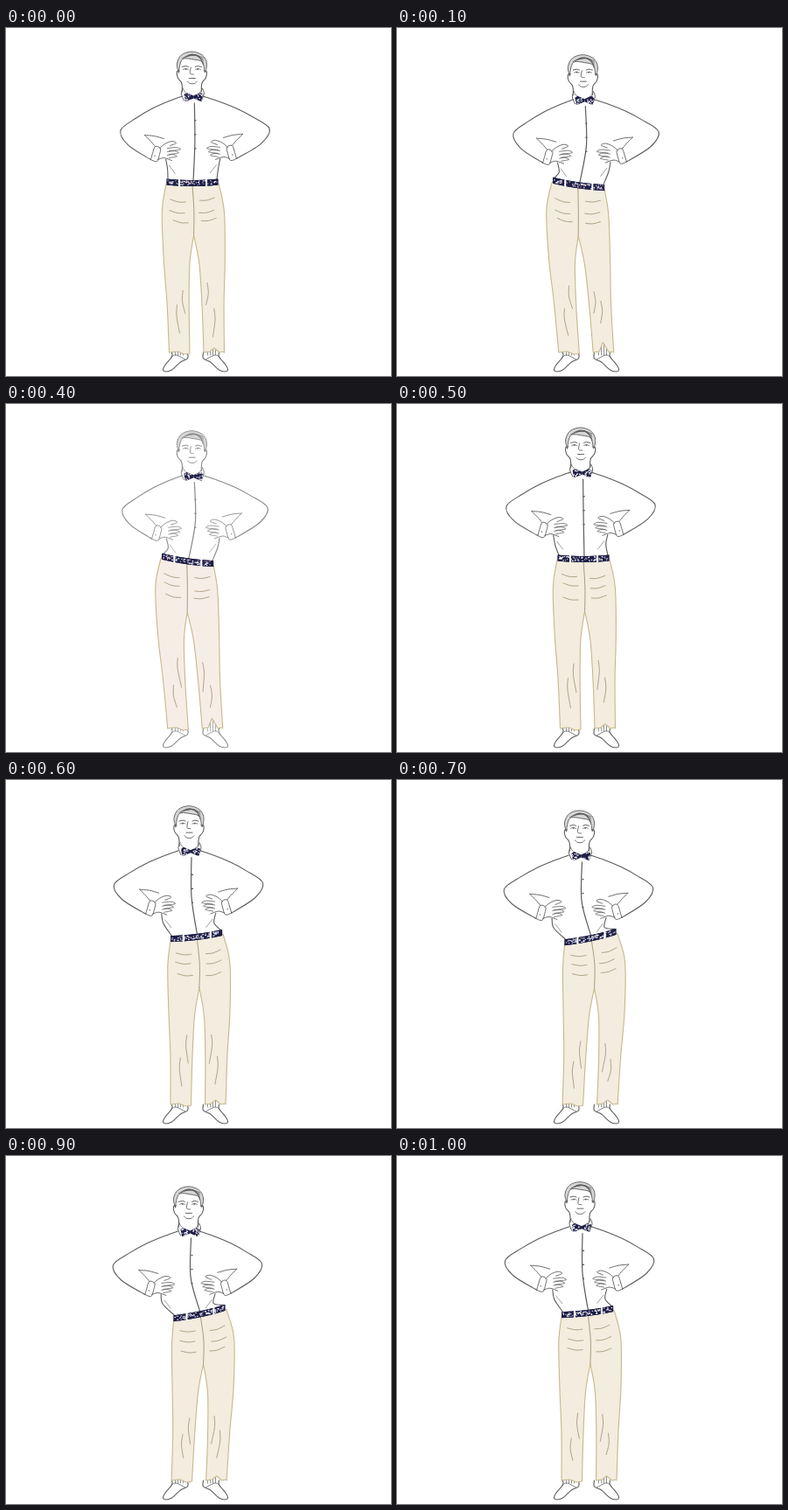
Write an HTML page with a canvas that moves like this. It is 440 px wide and 398 px high and loops after 1.1 s.

```html
<!DOCTYPE html>
<html lang="en">
<head>
<meta charset="utf-8">
<title>Hip sway</title>
<style>
html, body { margin: 0; width: 100%; height: 100%; overflow: hidden; background: #fff; }
canvas { display: block; width: 440px; height: 398px; }
</style>
</head>
<body>
<canvas id="stage" width="440" height="398"></canvas>
<script>
const ctx = document.getElementById('stage').getContext('2d');
const STEP = 100, STEPS = 11, TURN = 5;
const NAVY = '#1f1f48', TAN = '#c9b78c', FOLD = '#a89a7c';
const SIDES = [-1, 1];

function random(seed) {
  return () => (seed = (seed * 16807) % 2147483647) / 2147483647;
}

// The hips swing left for five steps, then right for six.
function poseAt(i) {
  const first = i < TURN;
  const s = first ? -Math.sin(Math.PI * i / TURN)
                  : Math.sin(Math.PI * (i - TURN) / (STEPS - TURN));
  const faded = i === TURN - 1;
  const bob = 10.5 * s * s;
  const drift = (first ? 3 : -3) - 3 * Math.max(s, 0);
  return {
    s,
    ink: faded ? '#8a8a8a' : '#5c5c5c',
    cloth: faded ? '#f7ede7' : '#f3ecdf',
    specks: first ? ['#fff', '#fff', '#d9a3c0', '#9db8c0'] : ['#fff', '#e4e4ee'],
    rnd: random(401 + i * 7919),
    head: [211 + .45 * drift, 27 + bob],

    // Upper body: follows the bob, and drifts more the farther out it is.
    torso(side, dx, y) {
      const far = dx / 85;
      const reach = dx * (1 + .04 * Math.min(s, 0));
      return [211 + .45 * drift + (2 + .55 * drift) * far + side * reach, y + bob - side * far];
    },

    // Lower body: tilts at the belt, swings most at the hips, rests at the hems.
    hip(dx, y) {
      const v = Math.max(0, (y - 176) / 195);
      const swing = 9 - 6 * v + 5.5 * Math.sin(Math.PI * v ** .6);
      const tilt = 4 * Math.abs(s) - 7.3 * s * dx / 30;
      return [213 + 5 * v + dx + s * swing, y + tilt * (1 - v) ** 3];
    }
  };
}

// Smooth curve through every point; starts a subpath or joins the current one.
function curve(p, join) {
  const at = i => p[Math.max(0, Math.min(p.length - 1, i))];
  ctx[join ? 'lineTo' : 'moveTo'](...p[0]);
  for (let i = 0; i < p.length - 1; i++) {
    const [a, b, c, d] = [at(i - 1), at(i), at(i + 1), at(i + 2)];
    ctx.bezierCurveTo(
      b[0] + (c[0] - a[0]) / 6, b[1] + (c[1] - a[1]) / 6,
      c[0] - (d[0] - b[0]) / 6, c[1] - (d[1] - b[1]) / 6, ...c);
  }
}

function line(p, color, width = 1.1, fill) {
  ctx.beginPath();
  curve(p);
  if (fill) { ctx.fillStyle = fill; ctx.fill(); }
  ctx.strokeStyle = color;
  ctx.lineWidth = width;
  ctx.stroke();
}

// Draws in local coordinates, mirrored when flip is -1.
function place([x, y], flip, draw) {
  ctx.save();
  ctx.translate(x, y);
  ctx.scale(flip, 1);
  draw();
  ctx.restore();
}

function drawShoe(side, { ink, s }) {
  place([216.5, 0], side, () => {
    line([[27, 371], [27, 376], [35, 386], [37, 391], [34, 393], [27, 391], [17, 382], [9, 378], [9, 371]], ink, 1.1, '#fff');
    line([[27, 376], [22, 374], [12, 379]], ink, .8);
    const top = side > 0 ? 366 + 8 * Math.min(s, 0) : 367;
    for (let x = 14; x < 26; x += 3) line([[x, top], [x, 374]], ink, .7);
  });
}

function drawTrousers({ hip, s, cloth, rnd }) {
  const outer = side => [[30, 178], [35.5, 210], [35, 265], [32.5, 315], [31.5, 371]]
    .map(([dx, y]) => hip(side * dx, y));
  const inner = side => [[0, 237], [5.5, 270], [7.5, 320], [8, 371]]
    .map(([dx, y]) => hip(side * dx, y));
  const slit = 4 + 11 * Math.max(-s, 0);

  ctx.beginPath();
  curve(outer(-1));
  curve([hip(-31.5, 371), hip(-22, 370), hip(-14, 373), hip(-8, 372)], true);
  curve(inner(-1).reverse(), true);
  curve(inner(1), true);
  for (const [dx, up] of [[15, 0], [20, slit], [26, -1], [31.5, 0]]) ctx.lineTo(...hip(dx, 370 - up));
  curve(outer(1).reverse(), true);
  ctx.closePath();
  ctx.fillStyle = cloth;
  ctx.fill();
  ctx.strokeStyle = TAN;
  ctx.lineWidth = 1.1;
  ctx.stroke();

  line([hip(0, 181), hip(1, 210), hip(0, 237)], FOLD, 1);
  for (const side of SIDES) {
    // Creases fan out from the crotch, then run down the shins.
    for (let i = 0; i < 3; i++) {
      const x = side * (6 + rnd() * 4), y = 219 - i * 12 + rnd() * 5;
      line([hip(x, y), hip(x + side * 8, y), hip(x + side * 17, y - 3)], FOLD, .9);
    }
    for (let i = 0; i < 2; i++) {
      const x = side * (14 + i * 7), y = 290 + i * 22 + rnd() * 12;
      line([hip(x, y), hip(x + side, y + 12), hip(x - side * 2, y + 24 + rnd() * 10)], FOLD, .9);
    }
  }
}

function drawShirt({ torso, hip, head: [hx, hy], s, ink }) {
  const arm = [[12, 78], [29, 84], [48, 92], [66, 102], [85, 116], [76, 133], [49, 150]];
  for (const side of SIDES) {
    line(arm.map(([dx, y]) => torso(side, dx, y)), ink);
    line([torso(side, 31, 150), torso(side, 29, 161), hip(side * 28, 173)], ink);
    line([torso(side, 27, 157), torso(side, 20, 166)], ink, .6);
  }
  line([[hx + 3, hy + 59], [hx + 3.5 - s, hy + 104], hip(1, 175)], ink, 1.2);
  ctx.fillStyle = ink;
  for (const dy of [78, 94, 110]) ctx.fillRect(hx + 3, hy + dy, 2, 1.4);
}

function drawHand(side, { torso, ink }) {
  place(torso(side, 49, 150), -side, () => {
    line([[0, 0], [2, -7], [5, -15], [11, -13], [10, -6], [7, 2], [0, 0]], ink, .9);
    line([[10, -13], [16, -18], [24, -21], [29, -19], [22, -16]], ink, .9);
    for (let i = 0; i < 3; i++) {
      const tip = 34 - i * 2, y = -14 + i * 4;
      line([[19, y + 1], [tip - 5, y], [tip, y + 2], [tip - 3, y + 3], [21, y + 4]], ink, .8);
    }
    line([[8, 0], [15, -2], [24, 1]], ink, .9);
    line([[-7, -28], [0, -21], [5, -15]], ink, .9);
    line([[-7, -28], [4, -27], [15, -24]], ink, .9);
    ctx.fillStyle = ink;
    ctx.fillRect(4, -5, 1.2, 1.2);
  });
}

function drawBelt({ hip, specks, rnd }) {
  const spot = (dx, w, h, dy, color) => {
    const [x, y] = hip(dx, 177.5 - dx * dx / 600);
    ctx.fillStyle = color;
    ctx.fillRect(x - w / 2, y + dy - h / 2, w, h);
  };
  for (let dx = -29; dx <= 29; dx += .5) spot(dx, 1.2, 7, 0, NAVY);
  for (let i = 0; i < 75; i++) {
    spot(rnd() * 56 - 28, .8 + rnd() * 1.2, 1.1, rnd() * 5 - 2.5, specks[i % specks.length]);
  }
  for (const dx of [-15, 16]) spot(dx, 2, 8.5, 0, '#fff');
}

function drawBow({ specks, rnd }) {
  for (const side of SIDES) {
    place([0, 0], side, () => {
      ctx.beginPath();
      for (const p of [[0, -1.5], [8, -5], [11, -3], [9.5, 5], [7, 4.5], [0, 1.5]]) ctx.lineTo(...p);
      ctx.closePath();
      ctx.fillStyle = NAVY;
      ctx.fill();
      ctx.clip();
      for (let i = 0; i < 22; i++) {
        ctx.fillStyle = specks[i % specks.length];
        ctx.fillRect(2 + rnd() * 9, rnd() * 10 - 5, 1.4, 1.2);
      }
    });
  }
}

function drawHead(pose) {
  const { ink } = pose;
  line([[-15, 24], [-17, 14], [-12, 4], [0, 0], [12, 4], [17, 13], [15, 24], [12, 12],
    [2, 9], [-9, 8], [-13, 13], [-15, 24]], ink, .9, '#d6d6d6');
  for (let i = 0; i < 5; i++) {
    line([[-11 + i * 2, 8 - i], [0 + i * 2, 3 + i * .5], [13, 7 + i * 2]], ink, .8);
  }
  for (const side of SIDES) {
    place([0, 0], side, () => {
      line([[14, 22], [17, 23], [16, 30], [12, 35], [11, 40], [11, 46]], ink);
      line([[4, 17.5], [7, 16.5], [11, 17.5]], ink, 1);
      line([[4, 20.5], [7, 19.5], [10, 20.5]], ink, .8);
      ctx.fillStyle = ink;
      ctx.fillRect(6, 19.5, 1.6, 1.4);
    });
    place([1, 0], side, () => {
      line([[11, 42], [13, 48], [10, 56]], ink, 1);
      line([[11, 43], [7, 48], [1, 51]], ink, .8);
    });
  }
  line([[-1, 18], [-2, 25], [2, 26]], ink, .9);
  line([[-3, 30.5], [4, 30.5]], ink, 1);
  line([[-5, 34], [-2, 36.5], [3, 36.5], [6, 34]], ink, .9);
  place([2, 52], 1, () => drawBow(pose));
}

function drawFigure(pose) {
  ctx.fillStyle = '#fff';
  ctx.fillRect(0, 0, 440, 398);
  ctx.lineCap = ctx.lineJoin = 'round';
  // The shoe is sketched for the left, so the right one is its mirror.
  for (const side of SIDES) drawShoe(side, pose);
  drawTrousers(pose);
  drawShirt(pose);
  drawBelt(pose);
  for (const side of SIDES) drawHand(side, pose);
  place(pose.head, 1, () => drawHead(pose));
}

let shown = -1;
const start = performance.now();
function tick(now) {
  const i = Math.floor(Math.max(0, now - start) / STEP) % STEPS;
  if (i !== shown) {
    shown = i;
    drawFigure(poseAt(i));
  }
  requestAnimationFrame(tick);
}
tick(start);
</script>
</body>
</html>
```
